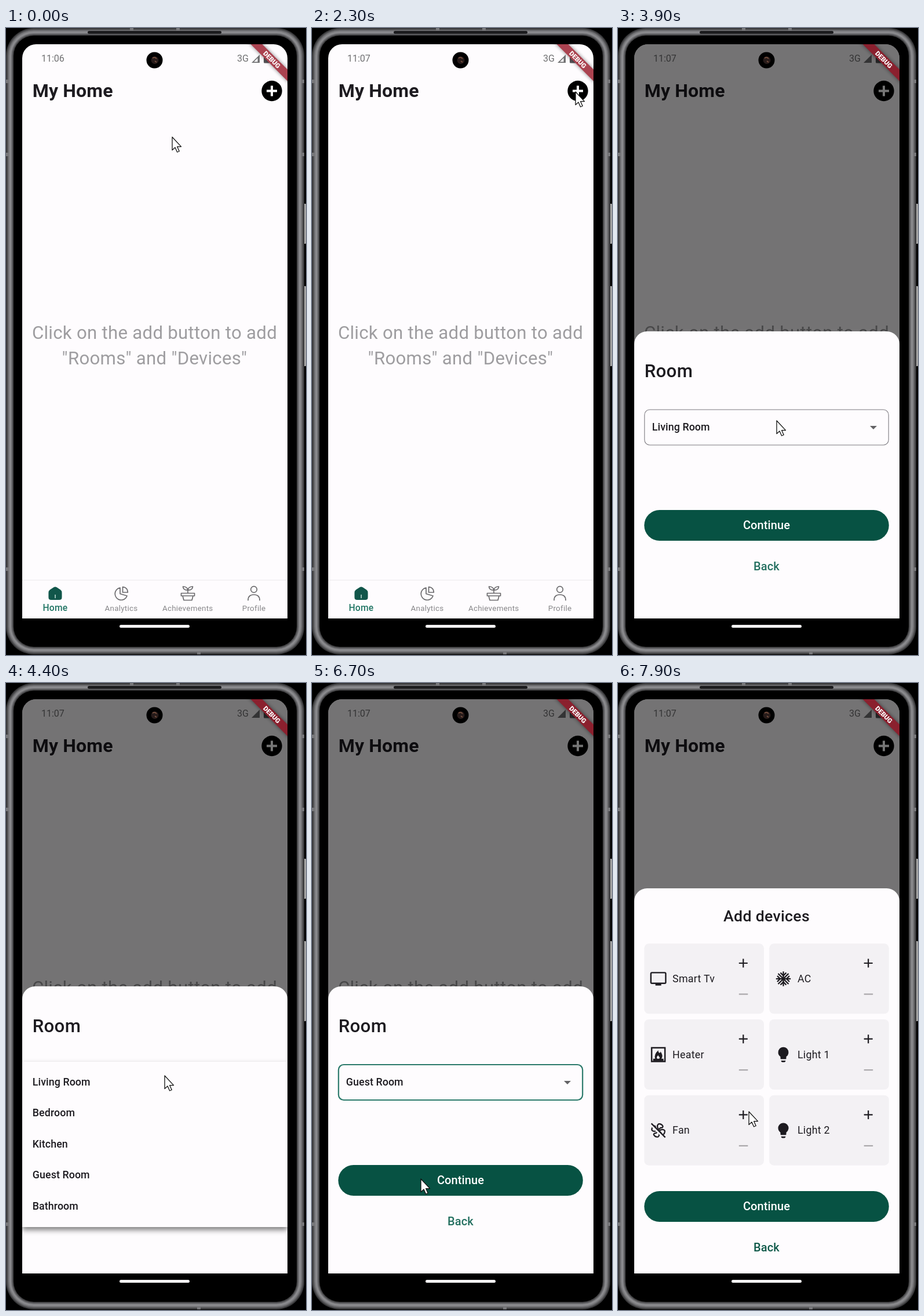
An HTML page for the animation above (8 s loop, 518 by 1081 pixels).

```html
<!DOCTYPE html>
<html lang="en">
<head>
<meta charset="utf-8">
<title>My Home</title>
<style>
  html, body { margin: 0; height: 100%; overflow: hidden; background: #000; }
  svg { display: block; width: 100vw; height: 100vh; }
  text { font: 400 17.8px Roboto, sans-serif; letter-spacing: .28px; fill: #1d1b20; }
  .medium { font-weight: 500; }
  .item { font-weight: 500; letter-spacing: .1px; }
  .title { font-size: 32px; font-weight: 600; letter-spacing: .15px; }
  .hint { font-size: 31.2px; fill: #9e9da0; }
  .status { font-size: 16px; letter-spacing: 0; fill: #707072; }
  .tab { font-size: 13.36px; fill: #88878a; }
  .tab.on { font-size: 15.6px; font-weight: 500; fill: #1f7463; }
  .button { font-size: 20px; font-weight: 500; letter-spacing: .1px; }
  .mid { text-anchor: middle; }
  .line { fill: none; stroke: #6b6a6d; stroke-width: 1.7; stroke-linejoin: round; stroke-linecap: round; }
  #menu rect { filter: drop-shadow(0 5px 5px rgba(0, 0, 0, .5)); }
</style>
</head>
<body>
<svg id="stage" viewBox="0 0 518 1081" preserveAspectRatio="none"></svg>
<script>
const INK = '#1d1b20', PAPER = '#fefcfe', GREEN = '#075243';
const stage = document.getElementById('stage');

const rect = (x, y, w, h, r, fill, extra = '') =>
  `<rect x="${x}" y="${y}" width="${w}" height="${h}" rx="${r}" fill="${fill}" ${extra}/>`;
const text = (x, y, cls, str, extra = '') =>
  `<text x="${x}" y="${y}" class="${cls}" ${extra}>${str}</text>`;
const path = (d, extra = '') => `<path d="${d}" ${extra}/>`;
const shell = (inset, fill) =>
  rect(inset, inset, 515 - 2 * inset, 1080 - 2 * inset, 48 - inset, fill);

const phone = () =>
  rect(514, 303, 4, 69, 1, '#a3a3a3') + rect(514, 445, 4, 138, 1, '#a3a3a3') +
  shell(0, '#38383a') + shell(2, '#58585a') + shell(4, '#77777a') + shell(6, '#8a8a8d') +
  shell(9, '#6c6c6f') + shell(11, '#454547') + shell(13, '#000') +
  rect(141, 5, 231, 5, 2.5, '#1c1c1e') +
  [92, 218, 933].map(y => rect(0, y - 3, 6, 6, 0, '#77777a') + rect(509, y - 3, 6, 6, 0, '#77777a')).join('') +
  [217, 297].map(x => rect(x - 3, 0, 6, 5, 0, '#77777a')).join('') +
  rect(330, 1074, 6, 6, 0, '#77777a') +
  rect(196, 1029, 121, 5, 2.5, '#f4f3f4');

const navigation = () =>
  path('M28 952H486', 'stroke="#f1eff2" stroke-width="1.5"') +
  path('M82 964.4q3-2 6 0l6 4q2.500 1.800 2.500 5v8q0 4.600-4.600 4.600H78q-4.600 0-4.600-4.600v-8q0-3.200 2.500-5z', 'fill="#11564a"') +
  path('M85 977.500v5', 'stroke="#b9d6cf" stroke-width="1.600" stroke-linecap="round"') +
  `<g class="line">` +
  path('M197 965a10.700 10.700 0 1 0 12 14l-12-3.500zM201.500 963.500v9.500h8.800q-.3-8.500-8.800-9.500z') +
  path('M302.500 974.500h23v4.500h-23zM305 979l2 7.500h14l2-7.500M314 974v-5M314 969q-1-6-8.500-6 .5 6.500 8.500 6zM314 969q1-6 8.500-6-.5 6.500-8.500 6z') +
  `<circle cx="428" cy="968" r="5.300"/>` +
  path('M418 986.500q0-9.500 10-9.500t10 9.500') + `</g>` +
  text(85, 1004.5, 'tab on mid', 'Home') + text(199, 1005, 'tab mid', 'Analytics') +
  text(313.7, 1005, 'tab mid', 'Achievements') + text(428, 1005, 'tab mid', 'Profile');

const home = () =>
  rect(28, 28, 458, 990, 0, PAPER) +
  text(61, 58, 'status', '', 'id="clock"') + text(399, 58, 'status', '3G') +
  path('M424 60L438 46V60Z', 'fill="#707072"') +
  path('M428 58.300L434.500 51.800V58.300Z', `id="weak" fill="${PAPER}"`) +
  rect(445, 45.5, 10.5, 15, 1.5, '#58575a') +
  text(45.8, 119, 'title', 'My Home') +
  `<circle id="ripple" cx="459" cy="108.500" r="26" opacity=".1"/><circle cx="459" cy="108.500" r="17.700"/>` +
  path('M459 99.500v18M450 108.500h18', 'stroke="#fff" stroke-width="4"') +
  text(256.5, 536, 'hint mid', 'Click on the add button to add') +
  text(256.5, 580, 'hint mid', '"Rooms" and "Devices"') + navigation();

const banner = () => `<g transform="translate(459 54.500) rotate(45)">` +
  rect(-60, -7.2, 120, 14.4, 0, '#000', 'opacity=".45" filter="url(#soft)"') +
  rect(-60, -7, 120, 14, 0, '', 'id="ribbon"') +
  text(0, 4, 'mid', 'DEBUG', 'style="font-size:11.400px;font-weight:900;fill:#fff;letter-spacing:0"') + `</g>`;

const sheet = top => path(`M28 1018V${top + 22}a22 22 0 0 1 22-22H464a22 22 0 0 1 22 22V1018Z`, `fill="${PAPER}"`);
const actions = (y, backColor) =>
  rect(45.3, y, 422.5, 53, 26.5, GREEN) +
  text(256.5, y + 33, 'button mid', 'Continue', 'style="fill:#fff"') +
  text(256.5, y + 104, 'button mid', 'Back', `style="fill:${backColor}"`);

const rooms = ['Living Room', 'Bedroom', 'Kitchen', 'Guest Room', 'Bathroom'];
const roomSheet = () => `<g id="roomSheet">` + sheet(523) +
  text(45.8, 602, 'medium', 'Room', 'style="font-size:31.200px"') +
  rect(45.8, 658, 421.4, 61, 9, 'none', 'id="field"') + text(58.8, 694, 'item', '', 'id="choice"') +
  path('M435 686h12l-6 6z', 'fill="#636265"') + actions(831, '#247060') +
  `<g id="menu">` + rect(28, 653, 458, 285, 0, PAPER) +
  rooms.map((name, i) => text(45.8, 694 + i * 53.4, 'item', name)).join('') + `</g></g>`;

// Icons are drawn around their own centre.
const stroke = w => `fill="none" stroke="${INK}" stroke-width="${w}"`;
const spin = (angles, d, extra) => angles.map(a => path(d, `transform="rotate(${a})" ${extra}`)).join('');
const bulb = path('M-5 6.500V3.500a9 9 0 1 1 10 0V6.500q0 1.300-1.300 1.300H-3.700Q-5 7.800-5 6.500ZM-3.800 10.300H3.800Q3.800 13 1.500 13H-1.500Q-3.800 13-3.800 10.300Z', `fill="${INK}"`);
const icons = {
  tv: rect(-12.8, -10.6, 25.6, 18.4, 1.8, 'none', stroke(2.4)) + rect(-5, 8, 10, 3.6, 0, INK),
  snow: spin([0, 45, 90, 135], 'M0-12.700V12.700', stroke(2.3)) +
    spin([0, 90, 180, 270], 'M-5-10.500L0-5.500 5-10.500', stroke(2.3)),
  fire: rect(-11.5, -11.8, 23, 23.6, 0, 'none', stroke(2.5)) +
    path('M-9 11V7H-5.500Q-8-.5 0-7.500q-.3 4 2.500 4.500 1.500-.3 1.200-2.500Q9 1 5.500 7H9v4z', `fill="${INK}"`) +
    path('M-2 7q-2-3 2-6 0 2 2 3 1 1.500-.5 3z', 'fill="#f3f1f4"'),
  bulb,
  fan: spin([20, 110, 200, 290], 'M0-1.500Q-6-6-3.500-10.500 1-13 5-9.500 6-7 2-5.500z', stroke(2.2)) +
    path('M-12.500-10.500L10.500 12.500', 'stroke="#f3f1f4" stroke-width="5"') +
    path('M-12-12L12 12', stroke(2.3)),
};
const devices = [['Smart Tv', 'tv'], ['AC', 'snow'], ['Heater', 'fire'], ['Light 1', 'bulb'], ['Fan', 'fan'], ['Light 2', 'bulb']];
const card = ([name, icon], i) =>
  `<g transform="translate(${45.3 + i % 2 * 215.9} ${449.3 + (i >> 1) * 130.7})">` +
  rect(0, 0, 206.6, 121, 8, '#f3f1f4') +
  `<g transform="translate(24.300 60.700)">${icons[icon]}</g>` + text(48.8, 66.6, '', name) +
  path('M171 26.200v15M163.500 33.700h15', stroke(2.2)) +
  path('M163.500 87.200h15.500', 'stroke="#a9a7aa" stroke-width="2.200"') + `</g>`;
const deviceSheet = () => `<g id="deviceSheet">` + sheet(354) +
  text(256.5, 411, 'medium mid', 'Add devices', 'style="font-size:26.700px"') +
  devices.map(card).join('') + actions(876, '#105a4a') + `</g>`;

const camera = `<circle cx="256.500" cy="55.500" r="14"/><circle cx="257" cy="55.500" r="6.500" fill="#271b1a"/>` +
  path('M253 52q4-3 7 1M257 57l3 2', 'fill="none" stroke="#76503f" stroke-width="1.800"');

stage.innerHTML = `<defs>
  <clipPath id="screen"><path d="M28 1018V52a24 24 0 0 1 24-24H462a24 24 0 0 1 24 24V1018Z"/></clipPath>
  <filter id="soft" x="-20%" y="-100%" width="140%" height="300%"><feGaussianBlur stdDeviation="3"/></filter>
</defs>` + phone() + `<g clip-path="url(#screen)">` + home() +
  rect(28, 28, 458, 990, 0, '#000', 'id="scrim" opacity=".54"') +
  roomSheet() + deviceSheet() + banner() + `</g>` + camera +
  path('M0 0V22.500L5 18 8.600 26 12.200 24.500 8.600 16.600H15.500Z', 'id="cursor" fill="#fff" stroke="#111" stroke-width="1.300" stroke-linejoin="round"');

const el = Object.fromEntries([...stage.querySelectorAll('[id]')].map(node => [node.id, node]));
const show = (node, on) => node.setAttribute('display', on ? 'inline' : 'none');

// Cursor stops: time, x, y
const route = [
  [0, 287, 188], [1800, 484, 147], [2300, 455, 110], [3100, 455, 110], [3900, 274, 677],
  [4700, 274, 677], [5200, 200, 800], [5500, 200, 800], [5900, 186, 853], [6000, 186, 853],
  [6700, 188, 855], [7000, 188, 855], [7900, 226, 739], [8000, 226, 739],
];
function cursorAt(t) {
  const i = route.findIndex(stop => stop[0] > t);
  const [t0, x0, y0] = route[i - 1], [t1, x1, y1] = route[i];
  const p = (t - t0) / (t1 - t0), k = p * p * (3 - 2 * p);
  return [x0 + (x1 - x0) * k, y0 + (y1 - y0) * k];
}

function render(ms) {
  const t = Math.floor(ms % 8000 / 100) * 100;
  const dimmed = t >= 3100, picked = t >= 6100;
  el.clock.textContent = t < 500 ? '11:06' : '11:07';
  show(el.weak, t < 3500);
  show(el.ripple, t >= 3100 && t < 3300);
  show(el.scrim, dimmed);
  show(el.roomSheet, dimmed && t < 7100);
  show(el.menu, t >= 4400 && !picked);
  show(el.deviceSheet, t >= 7100);
  el.choice.textContent = picked ? rooms[3] : rooms[0];
  el.field.setAttribute('stroke', picked ? '#2b7a6b' : '#7d7a80');
  el.field.setAttribute('stroke-width', picked ? 2.2 : 1.1);
  el.ribbon.setAttribute('fill', dimmed ? '#8b202e' : '#ab4350');
  el.cursor.setAttribute('transform', `translate(${cursorAt(t)})`);
}

const start = performance.now();
function tick() {
  render(performance.now() - start);
  requestAnimationFrame(tick);
}
tick();
</script>
</body>
</html>
```
